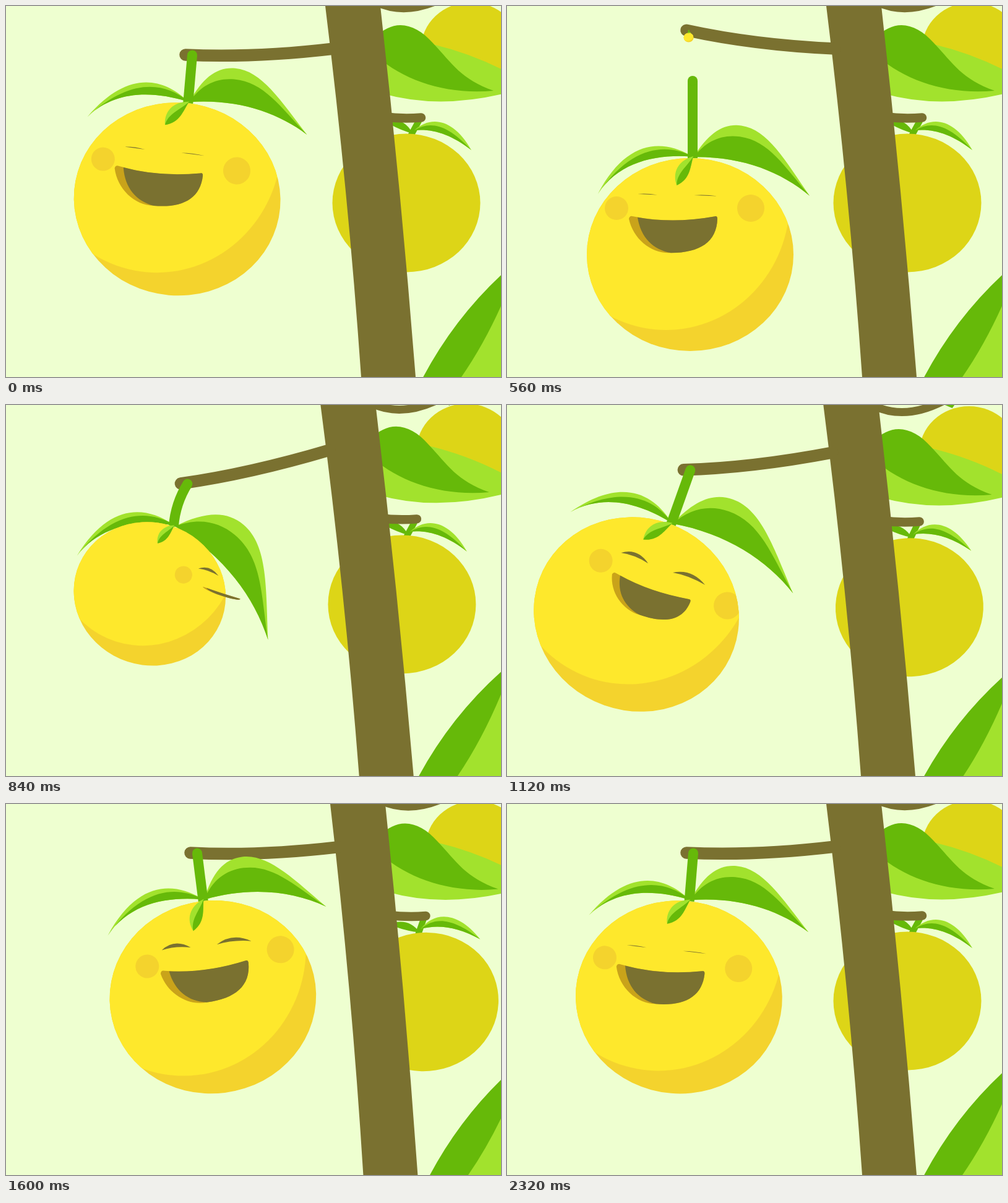
These frames come from a looping animation (800 by 600 pixels, 2.36 s). An HTML page with a canvas:

```html
<!DOCTYPE html>
<html lang="en">
<head>
<meta charset="utf-8">
<title>Swinging fruit</title>
<style>
  html, body { margin: 0; width: 100%; height: 100%; overflow: hidden; background: #eeffd0; }
  canvas { display: block; width: 100vw; height: 100vh; }
</style>
</head>
<body>
<canvas id="stage" width="800" height="600"></canvas>
<script>
const ctx = document.getElementById('stage').getContext('2d');
const LOOP = 2360, STEP = 40, BIRTH = 545, RELEASE = 480, GONE = 840;
const C = {
  bg: '#eeffd0', wood: '#7a7130', green: '#66b909', light: '#a2e22d', back: '#ddd517',
  skin: '#fee82c', shade: '#f4d32d', lip: '#c9a31a'
};

const rad = deg => deg * Math.PI / 180;
const part = (t, from, to) => Math.min(1, Math.max(0, (t - from) / (to - from)));
// 0 to 1 with soft ends
const ramp = (t, from, to) => { const u = part(t, from, to); return u * u * (3 - 2 * u); };
// 0 to 1 and back to 0
const bump = (t, from, to) => Math.sin(Math.PI * part(t, from, to)) ** 2;

// The branch sags, springs up at the release, then bows under the new fruit.
function treePose(t) {
  const sway = -8 * Math.sin(2 * Math.PI * part(t, 560, 1960));
  return {
    sway,
    drop: 8 * bump(t, 560, 1700),
    swing: -9.5 * bump(t, 840, 2240),
    tip: {
      x: 290 + sway,
      y: 79 + 9 * bump(t, 120, 560) - 44 * bump(t, 440, 640)
        + 48 * ramp(t, 560, 840) * (1 - ramp(t, 840, 1430))
    }
  };
}

// A fruit grows in one loop and falls in the next; t is its age.
function fruitPose(t) {
  const size = 1 - (1 - part(t, BIRTH, 1120)) ** 1.87;
  return {
    size,
    angle: 31.5 * bump(t, 665, 1305) - 7.2 * bump(t, 1240, 1960) + 5.1 * bump(t, 1960, 2840),
    stretch: 20 * bump(t, 560, 1400) + 47 * ramp(t, 2360, 2840),
    bend: -9 * bump(t, 600, 1120),
    leaf: size + .5 * bump(t, 560, 1240),
    droop: 85 * (1 - size) + 8 * ramp(t, 2560, 2920),
    bud: 16 * bump(t, 840, 1400) + 20 * bump(t, 1960, 3100),
    turn: 263 - 255 * ramp(t, 560, 1220) - 26 * ramp(t, 1700, 2360) + 6 * ramp(t, 2560, 2920),
    lift: -3.5 + 8.5 * ramp(t, 1600, 2320) - 21 * ramp(t, 2520, 2920),
    eyes: 1 - ramp(t, 1960, 2240),
    mouth: ramp(t, 820, 1220)
  };
}

const path = d => new Path2D(d);
const P = {
  trunk: path('M516 0Q553 300 574 600H662Q638.5 300 605 0Z'),
  topTwig: path('M599 -6Q651 18 716 -18'),
  topStem: path('M698 -14L724 -3L732 -14Z'),
  bigLeaf: path('M600 85L690 62Q765 80 830 118V135Q710 170 610 142Z'),
  bigLeafDark: path('M596 52C625 20 660 26 690 60C722 94 735 118 788 137C715 144 645 122 600 82Z'),
  twig: path('M610 179Q640 183 671 180.5'),
  backStem: path('M667 186L655 208'),
  backLeft: path('M618 184Q645 182 657 206Q640 202 618 190Z'),
  backLeaf: path('M660 201C685 178 722 180 752 233C720 208 690 198 660 201Z'),
  backLeafDark: path('M660 201C685 186 712 190 752 233C720 208 690 198 660 201Z'),
  lowLeaf: path('M668 612Q722 505 810 426L840 405V640H650Z'),
  lowLeafLight: path('M720 622Q775 550 815 450L830 410V640H710Z'),
  right: path('M2 0C20 -42 42 -61 71 -61C114 -61 149 -15 196 36C145 4 79 -12 2 0Z'),
  rightDark: path('M2 0C18 -29 42 -43 71 -43C119 -43 149 -5 196 36C145 4 79 -12 2 0Z'),
  left: path('M-3 -3C-46 -36 -103 -42 -160 38C-120 -8 -60 -13 -3 -1Z'),
  leftDark: path('M-3 -3C-40 -27 -95 -33 -160 38C-120 -8 -60 -13 -3 -1Z'),
  bud: path('M1 -2C-24 7 -31 28 -22 47C-2 35 -2 15 1 -2Z'),
  budDark: path('M1 -2C-8 16 -24 28 -22 47C0 35 -3 15 1 -2Z')
};

function fill(shape, color) {
  ctx.fillStyle = color;
  ctx.fill(shape);
}

function stroke(shape, color, width, cap = 'round') {
  ctx.strokeStyle = color;
  ctx.lineWidth = width;
  ctx.lineCap = cap;
  ctx.stroke(shape);
}

function oval(x, y, rx, ry = rx) {
  const p = new Path2D();
  p.ellipse(x, y, rx, ry, 0, 0, 2 * Math.PI);
  return p;
}

function group(draw) {
  ctx.save();
  draw();
  ctx.restore();
}

function leaf(name, angle, scale) {
  group(() => {
    ctx.rotate(rad(angle));
    ctx.scale(scale, scale);
    fill(P[name], C.light);
    fill(P[name + 'Dark'], C.green);
  });
}

function drawEye(x, y, half, open) {
  const w = half * (.68 + .32 * open);
  const top = -1.5 - 15 * open, low = .5 - 5 * open;
  fill(path(`M${x - w} ${y}Q${x - 1} ${y + top} ${x + w} ${y + 1.5}Q${x - 1} ${y + low} ${x - w} ${y}Z`), C.wood);
}

function drawMouth(open) {
  const w = .6 + .4 * open, h = .1 + .9 * open;
  const at = (...pts) => pts.map(([x, y]) => `${-16 + (x + 16) * w} ${-48 + (y + 48) * h}`).join(' ');
  const side = `Q${at([56, -50], [56, -45])}C${at([55, -8], [28, 10], [-19, 10])}`;
  fill(path(`M${at([-87, -45])}Q${at([-86, -51], [-80, -49])}Q${at([-15, -36], [52, -49])}`
    + `${side}C${at([-50, 12], [-80, -12], [-87, -45])}Z`), C.lip);
  fill(path(`M${at([-73, -47.5])}Q${at([-15, -37], [52, -49])}`
    + `${side}C${at([-48, 5], [-68, -15], [-73, -47.5])}Z`), C.wood);
}

function drawFace(f, body) {
  group(() => {
    ctx.clip(body);
    fill(oval(-39, -87, 200, 209), C.skin);
    ctx.translate(f.turn, f.lift);
    fill(oval(-107, -59, 19), C.shade);
    fill(oval(110, -59, 22), C.shade);
    drawEye(-57, -82, 23.5, f.eyes);
    drawEye(37, -80, 28, f.eyes);
  });
  if (f.turn > 195) return;
  ctx.translate(f.turn, f.lift * .8);
  drawMouth(f.mouth);
}

function drawFruit(age, tip) {
  const f = fruitPose(age);
  const n = (age - LOOP - RELEASE) / STEP;
  const falling = n >= 0;
  const x = falling ? 300 : tip.x + 3 + 8 * Math.min(1, 2 * f.size);
  const y = falling ? 89 + 6 * n * n + 4 * n : tip.y + .5;
  const len = 78 * f.size + f.stretch;

  group(() => {
    ctx.translate(x, y);
    ctx.rotate(rad(f.angle));
    group(() => {
      ctx.translate(0, len - 2);
      leaf('right', f.droop, f.leaf);
      leaf('left', -f.droop, Math.min(1, f.leaf));
    });
    const width = 16 * Math.min(1, 3 * f.size);
    stroke(path(`M0 0Q${f.bend} ${len / 2} 0 ${len}`), C.green, width, 'butt');
    fill(oval(0, 0, width / 2), C.green);

    group(() => {
      ctx.translate(-4 * f.size, len + 156 * f.size);
      ctx.scale(f.size, f.size);
      const body = oval(0, 0, 167, 156);
      fill(body, C.shade);
      drawFace(f, body);
    });
    ctx.translate(0, len - 1);
    leaf('bud', f.bud, f.size);
  });
}

function drawTree({ sway, drop, swing, tip }) {
  group(() => {
    ctx.translate(sway * .93, drop);
    fill(P.topStem, C.green);
    fill(oval(751, 70, 80.5, 76), C.back);
    stroke(P.topTwig, C.wood, 13);
    fill(P.bigLeaf, C.light);
    fill(P.bigLeafDark, C.green);
    group(() => {
      ctx.translate(664, 183);
      ctx.rotate(rad(swing));
      ctx.translate(-664, -183);
      stroke(P.backStem, C.green, 10);
      fill(P.backLeft, C.green);
      fill(P.backLeaf, C.light);
      fill(P.backLeafDark, C.green);
      fill(oval(647, 318.5, 119.5, 112), C.back);
    });
    stroke(P.twig, C.wood, 14.5);
  });
  group(() => {
    ctx.transform(1, 0, -sway / 1050, 1, sway, 0);
    fill(P.trunk, C.wood);
  });
  group(() => {
    ctx.translate(sway * 1.3, drop * 1.4);
    fill(P.lowLeaf, C.green);
    fill(P.lowLeafLight, C.light);
  });
  const rootX = 530 + sway * .93, rootY = 69 + drop;
  const midY = rootY + 10 + .53 * (tip.y - rootY);
  stroke(path(`M${tip.x} ${tip.y}Q${tip.x + 110} ${midY} ${rootX} ${rootY}`), C.wood, 19.5);
}

function draw(t) {
  const pose = treePose(t);
  fill(path('M0 0H800V600H0Z'), C.bg);
  drawTree(pose);
  if (t < GONE) drawFruit(t + LOOP, pose.tip);
  if (t > BIRTH) drawFruit(t, pose.tip);
}

const start = performance.now();
function tick() {
  const t = (performance.now() - start) % LOOP;
  draw(Math.floor(t / STEP) * STEP);
  requestAnimationFrame(tick);
}
tick();
</script>
</body>
</html>
```
